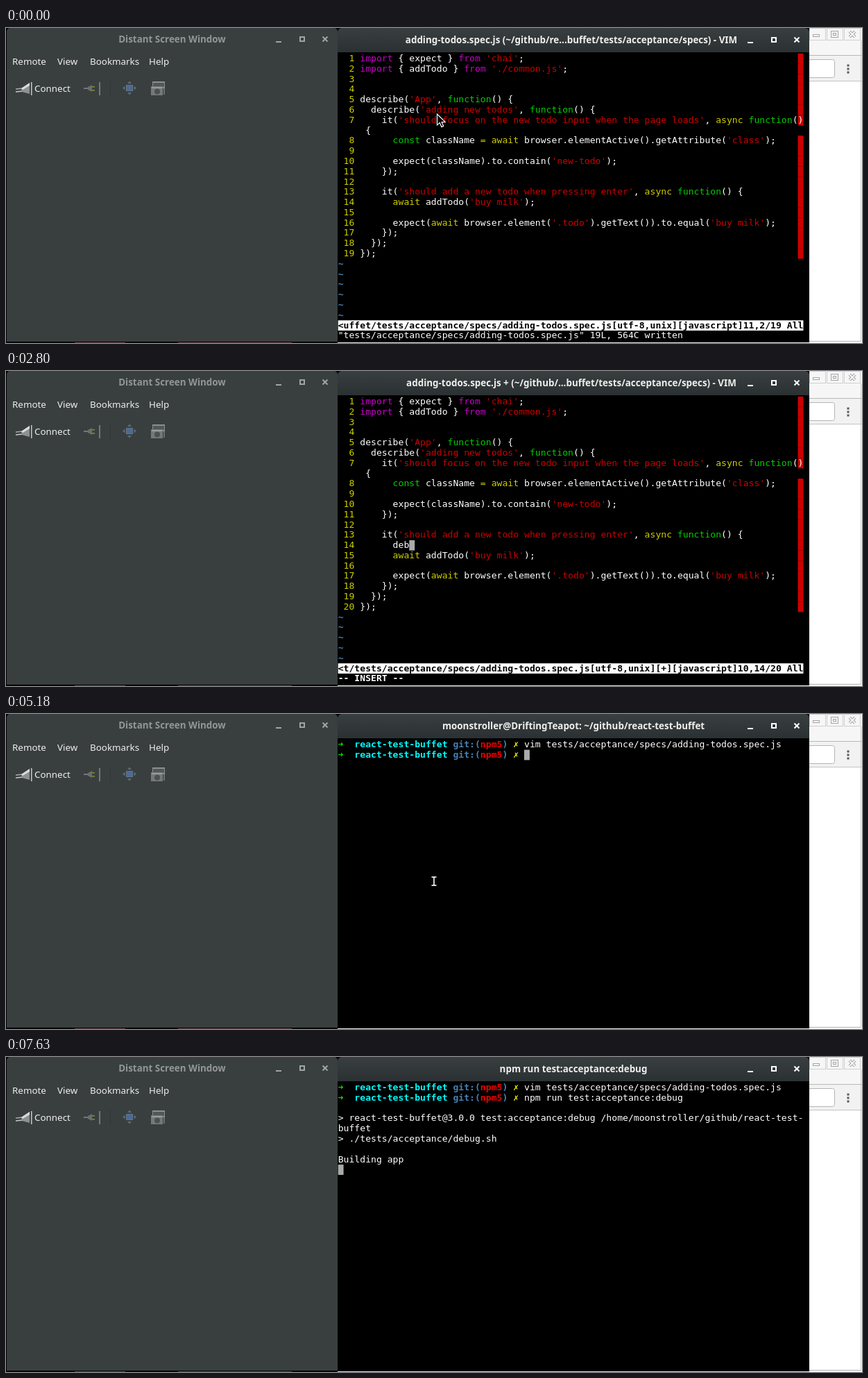
An HTML page with a canvas for the animation above (8000 ms loop, 1234 by 454 pixels).

```html
<!DOCTYPE html>
<html lang="en">
<head>
<meta charset="utf-8">
<title>Debugging an acceptance test</title>
<style>
html, body { margin: 0; width: 100%; height: 100%; overflow: hidden; background: #000; }
canvas { display: block; }
</style>
</head>
<body>
<canvas id="stage" width="1234" height="454"></canvas>
<script>
const ctx = document.getElementById('stage').getContext('2d');
const LOOP = 8000, TICK = 70;
const LEFT = 478.7, TOP = 36.8, CELL = 7.891, LINE = 14.79, COLS = 85;
const MONO = '13.1px "DejaVu Sans Mono", monospace';
const SANS = '13.4px "Noto Sans", "Open Sans", sans-serif';
const WHITE = '#fff', RED = '#cd0000', GREEN = '#00cd00', YELLOW = '#cdcd00',
      MAGENTA = '#cd00cd', BLUE = '#4682b4', CYAN = '#00ffff';

const FILE = 'tests/acceptance/specs/adding-todos.spec.js';
const VIM_TITLE = 'adding-todos.spec.js (~/github/re...buffet/tests/acceptance/specs) - VIM';
const EDIT_TITLE = 'adding-todos.spec.js + (~/github/...buffet/tests/acceptance/specs) - VIM';
const SHELL_TITLE = 'moonstroller@DriftingTeapot: ~/github/react-test-buffet';
const DEBUG = 'npm run test:acceptance:debug';

const CODE = `import { expect } from 'chai';
import { addTodo } from './common.js';


describe('App', function() {
  describe('adding new todos', function() {
    it('should focus on the new todo input when the page loads', async function() {
      const className = await browser.elementActive().getAttribute('class');

      expect(className).to.contain('new-todo');
    });

    it('should add a new todo when pressing enter', async function() {
      await addTodo('buy milk');

      expect(await browser.element('.todo').getText()).to.equal('buy milk');
    });
  });
});`.split('\n');

const KEYWORDS = {
  import: MAGENTA, from: MAGENTA, debugger: MAGENTA,
  function: GREEN, const: GREEN, async: YELLOW, await: YELLOW, '=': YELLOW
};

// Timelines: [start time, value]
const TITLE = [[0, VIM_TITLE], [1890, EDIT_TITLE], [5040, VIM_TITLE], [5180, SHELL_TITLE], [6440, DEBUG]];
const TYPED = [[0, null], [1820, ''], [2310, 'd'], [2450, 'de'], [2800, 'deb'], [2940, 'debu'],
  [3150, 'debug'], [3500, 'debugge'], [3570, 'debugger']];
const POSITION = [[0, '11,2'], [1050, '14,13'], [1890, '7,14'], [2310, '8,14'], [2450, '9,14'],
  [2800, '10,14'], [2940, '11,14'], [3500, '14,14'], [3570, '15,14'], [4340, '14,14']];
const MESSAGE = [[0, `"${FILE}" 19L, 564C written`], [1890, '-- INSERT --'], [3920, ''], [4340, ':'],
  [4480, ':w'], [4690, ':wq'], [5040, `"${FILE}" 20L, 579C written`]];
const COMMAND = [[0, ''], [5880, 'vim ' + FILE], [6090, DEBUG]];
const CURSOR = [[0, null], [210, [14, 1]], [910, null], [1540, [17, 13]], [1820, [10, 14]],
  [2310, [11, 14]], [2450, [12, 14]], [2800, [13, 14]], [2940, [14, 14]], [3500, [17, 14]],
  [3570, [18, 14]], [3920, [17, 14]], [4340, [1, 27]], [4690, [3, 27]], [5040, null],
  [5180, [34, 1]], [5880, [82, 1]], [6090, [63, 1]], [6440, [0, 2]], [6860, [0, 7]],
  [7000, null], [7630, [0, 8]]];

const at = (line, t) => line.filter(([start]) => start <= t).pop()[1];

let cursor = null;

function rect(x, y, w, h, color) {
  ctx.fillStyle = color;
  ctx.fillRect(x, y, w, h);
}

function path(points, fill, stroke, width = 1) {
  ctx.beginPath();
  points.forEach(([x, y]) => ctx.lineTo(x, y));
  if (fill) { ctx.closePath(); ctx.fillStyle = fill; ctx.fill(); }
  if (stroke) { ctx.strokeStyle = stroke; ctx.lineWidth = width; ctx.stroke(); }
}

function frame(x, y, w, h, color, width = 1) {
  ctx.strokeStyle = color;
  ctx.lineWidth = width;
  ctx.strokeRect(x, y, w, h);
}

function label(text, x, y, color, bold, align = 'left') {
  ctx.font = (bold ? 'bold ' : '') + SANS;
  ctx.textAlign = align;
  ctx.fillStyle = color;
  ctx.fillText(text, x, y);
}

function cells(col, row, count, color) {
  rect(LEFT + col * CELL, TOP + row * LINE, count * CELL, LINE, color);
}

// Writes text on the terminal grid and returns the next column.
function put(text, col, row, color = WHITE, bold = false) {
  ctx.font = (bold ? 'bold ' : '') + MONO;
  ctx.textAlign = 'left';
  for (const ch of text) {
    const covered = cursor && cursor[0] === col && cursor[1] === row;
    ctx.fillStyle = covered ? '#000' : color;
    if (ch !== ' ') ctx.fillText(ch, LEFT + col * CELL, TOP + row * LINE + 11.25);
    col++;
  }
  return col;
}

function putCode(text, row) {
  let col = 4;
  for (const token of text.match(/'[^']*'|\w+|./g) || []) {
    const color = token[0] === "'" ? RED : KEYWORDS[token] || WHITE;
    if (col >= COLS) { row++; col = 4; }
    col = put(token, col, row, color);
  }
  return row + 1;
}

function windowButtons(x, y, color) {
  rect(x - 4, y + 3, 8, 2, color);
  frame(x + 31, y - 3, 6, 6, color, 2);
  path([[x + 63.5, y - 3.5], [x + 70.5, y + 3.5]], null, color, 2);
  path([[x + 70.5, y - 3.5], [x + 63.5, y + 3.5]], null, color, 2);
}

function drawViewer() {
  rect(0, 0, 478, 454, '#000');
  ctx.beginPath();
  ctx.roundRect(1, 0, 477, 452, [5, 5, 0, 0]);
  ctx.fillStyle = '#393f3f';
  ctx.fill();
  label('Distant Screen Window', 239.5, 21, '#929696', true, 'center');
  windowButtons(393, 16, '#a0a4a4');
  [['Remote', 9], ['View', 74], ['Bookmarks', 121], ['Help', 206]]
    .forEach(([text, x]) => label(text, x, 53, '#eeeeec'));
  label('Connect', 41, 92, '#eeeeec');

  // connect
  path([[14, 88], [24, 87]], null, '#a9acaa', 1.5);
  path([[14, 92], [24, 91]], null, '#c9cbc8', 1.5);
  path([[22, 87], [34, 79], [34, 95], [23, 92]], '#8d918f');
  path([[22, 87], [34, 79], [34, 83], [24, 89]], '#dcddda');
  rect(36, 78, 1.5, 19, '#c6c8c5');
  // disconnect
  path([[112, 87], [119, 87]], null, '#747877', 2);
  path([[118, 85], [124, 82], [124, 92], [118, 89]], '#696e6d');
  rect(124, 84, 4, 1.5, '#848d3a');
  rect(124, 89, 4, 1.5, '#848d3a');
  rect(134, 78, 2, 19, '#747877');
  rect(150, 76, 1, 23, '#313737');
  // fullscreen
  rect(173, 82, 10, 9, '#69737a');
  rect(174, 83, 8, 7, '#466c9c');
  for (const [dx, dy] of [[0, -1], [0, 1], [-1, 0], [1, 0]]) {
    const x = 178 + dx * 6.5, y = 86.5 + dy * 6.5;
    path([[x + dx * 3.5, y + dy * 3.5], [x + dy * 3, y + dx * 3], [x - dy * 3, y - dx * 3]], '#5c6a7a');
  }
  // screenshot
  rect(211, 77, 18, 10, '#8b908e');
  rect(212, 79, 16, 6, '#515857');
  rect(209, 84, 17, 13, '#747978');
  rect(210, 85, 15, 2, '#979c99');
  rect(227, 87, 2, 9, '#6a706e');
  ctx.beginPath();
  ctx.arc(218, 91.5, 4, 0, 7);
  ctx.fillStyle = '#4a5150';
  ctx.fill();

  rect(99, 453, 73, 1, '#6b4a50');
  rect(248, 453, 164, 1, '#6b4a50');
}

function drawBrowser() {
  rect(1158, 0, 76, 454, '#fff');
  rect(1158, 0, 76, 40, '#f6f6f6');
  rect(1158, 39, 76, 1, '#b8b8b8');
  rect(1158, 40, 76, 36, '#f2f2f2');
  rect(1158, 76, 76, 1, '#c4c4c4');
  for (const x of [1158.5, 1183.5, 1208.5]) frame(x, .5, 23, 17, '#cfcfcf');
  // hollow window buttons
  frame(1163.5, 9.5, 9, 3, '#a5a5a5');
  frame(1189.5, 4.5, 10, 9, '#a5a5a5');
  frame(1192.5, 7.5, 4, 3, '#a5a5a5');
  for (const [color, width] of [['#a5a5a5', 4], ['#f6f6f6', 2]]) {
    path([[1216, 5], [1224, 13]], null, color, width);
    path([[1224, 5], [1216, 13]], null, color, width);
  }
  ctx.beginPath();
  ctx.roundRect(1140.5, 45.5, 54, 26, 3);
  ctx.fillStyle = '#fff';
  ctx.fill();
  ctx.strokeStyle = '#b5b5b5';
  ctx.lineWidth = 1;
  ctx.stroke();
  for (const y of [54, 59, 64]) rect(1212.5, y - 1.5, 3, 3, '#5a5a5a');
  rect(1232, 18, 1, 434, '#c8c8c8');
  rect(1158, 451, 74, 1, '#b0b0b0');
}

function drawTerminalWindow(t) {
  rect(478, 0, 680, 453, '#000');
  rect(478, 453, 680, 1, '#e6e6e6');
  const bar = ctx.createLinearGradient(0, 0, 0, 35);
  bar.addColorStop(0, '#393f40');
  bar.addColorStop(1, '#2b3132');
  ctx.beginPath();
  ctx.roundRect(478, 0, 680, 35, [6, 6, 0, 0]);
  ctx.fillStyle = bar;
  ctx.fill();
  label(at(TITLE, t), t < 5180 ? 815 : 818, 22, '#eeeeec', true, 'center');
  windowButtons(1073, 17, '#fff');
}

function drawVim(t) {
  const typed = at(TYPED, t), code = [...CODE];
  if (typed !== null) code.splice(13, 0, typed && '      ' + typed);
  let row = 0;
  code.forEach((text, i) => {
    cells(84, row, 1, RED);
    put(String(i + 1).padStart(3), 0, row, YELLOW);
    if (i === 13 && typed === '') put('······', 4, row, BLUE);
    row = putCode(text, row);
  });
  while (row < 26) put('~', 0, row++, BLUE, true);

  const changed = t >= 1890 && t < 5040;
  const status = `react-test-buffet/${FILE}[utf-8,unix]${changed ? '[+]' : ''}[javascript]` +
    `${at(POSITION, t)}/${t < 1890 ? 19 : 20} All`;
  cells(0, 26, COLS, WHITE);
  put('<' + status.slice(1 - COLS), 0, 26, '#000', true);
  const message = at(MESSAGE, t);
  put(message, 0, 27, WHITE, message.startsWith('--'));
}

function prompt(row, command) {
  put('➜', 0, row, '#00e000', true);
  put('react-test-buffet', 3, row, CYAN, true);
  put('git:(', 21, row, BLUE, true);
  put('npm5', 26, row, '#f00000', true);
  put(')', 30, row, BLUE, true);
  put('✗', 32, row, '#f0f000', true);
  put(command, 34, row);
}

function drawShell(t) {
  prompt(0, 'vim ' + FILE);
  prompt(1, at(COMMAND, t));
  if (t >= 6860) {
    put(`> react-test-buffet@3.0.0 ${DEBUG.slice(8)} /home/moonstroller/github/react-test-`, 0, 3);
    put('buffet', 0, 4);
    put('> ./tests/acceptance/debug.sh', 0, 5);
  }
  if (t >= 7490) put('Building app', 0, 7);
}

function drawPointer(t) {
  if (t < 1820) {
    const k = Math.min(1, Math.max(0, (t - 140) / 700)), ease = k * k * (3 - 2 * k);
    const x = 621.5 - 4.5 * ease, y = 124 + 115 * ease;
    const arrow = [[0, 0], [0, 16], [3.7, 12.6], [6.4, 18.6], [9.2, 17.4], [6.6, 11.6], [11.6, 11.4], [0, 0]];
    path(arrow.map(([dx, dy]) => [x + dx, y + dy]), '#000', '#fff', 1.2);
  } else if (t >= 4970 && t < 5810) {
    for (const [color, width, pad] of [['#000', 4, 1], ['#fff', 1.6, 0]]) {
      path([[617, 235 - pad], [617, 247 + pad]], null, color, width);
      for (const y of [235, 247]) path([[613.5 - pad, y], [620.5 + pad, y]], null, color, width);
    }
  }
}

function draw(now) {
  const t = Math.floor(now % LOOP / TICK) * TICK;
  cursor = at(CURSOR, t);
  drawViewer();
  drawBrowser();
  drawTerminalWindow(t);
  if (cursor) cells(...cursor, 1, '#aaa');
  (t < 5180 ? drawVim : drawShell)(t);
  drawPointer(t);
}

const start = performance.now();
function loop() {
  draw(performance.now() - start);
  requestAnimationFrame(loop);
}
loop();
</script>
</body>
</html>
```
